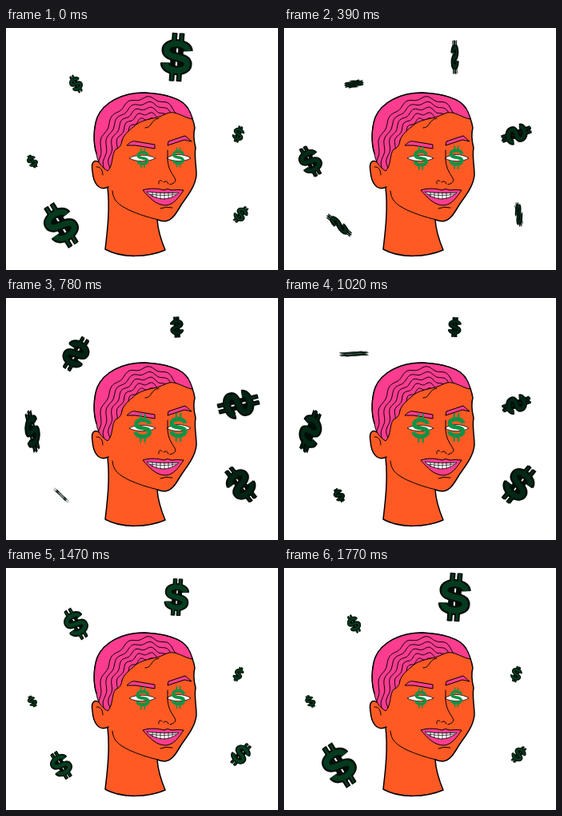
Animation of 340x303 px, one loop 1.8 s. Source, as an HTML page:

```html
<!DOCTYPE html>
<html lang="en">
<head>
<meta charset="utf-8">
<title>Dollar eyes</title>
<style>
  html, body { margin: 0; width: 100%; height: 100%; overflow: hidden; background: #fff; }
  svg { display: block; width: 340px; height: 303px; }
  .line { fill: none; stroke: #000; stroke-width: 1; stroke-linecap: round; stroke-linejoin: round; }
  .bold { stroke-width: 1.5; }
  .fine { stroke-width: .7; }
  .skin { fill: #ff5a24; }
  .pink { fill: #fc3d8f; stroke: #000; stroke-width: 1; stroke-linejoin: round; }
  .white { fill: #fff; stroke: #000; stroke-width: .8; stroke-linejoin: round; }
  .bars { stroke-width: var(--bar); }
  .edge { stroke: #020d08; stroke-width: 20; --bar: 10; }
  .face { stroke-width: 13; --bar: 5; }
  .eye { stroke: #0f9347; stroke-width: 15; --bar: 6; }
</style>
</head>
<body>
<svg viewBox="0 0 340 303">
  <defs>
    <path id="ess" fill="none" d="M24 -15C22 -35 -24 -35 -24 -15C-24 7 24 -7 24 15C24 35 -24 35 -25 14"/>
    <g id="dollar" fill="none">
      <use href="#ess"/>
      <path class="bars" d="M-8 -52V-31M8 -52V-31M-8 31V52M8 31V52"/>
    </g>
    <g id="struck" fill="none">
      <use href="#ess"/>
      <path class="bars" d="M-8 -54V54M8 -54V54"/>
    </g>
    <path id="hairShape" d="M127 179C119 174 114 167 113 157C109 145 109 126 114 112C122 93 145 81 173 81C197 82 220 88 227 100C230 105 232 110 233 114C224 113 213 104 204 106C197 108 192 112 184 113C175 115 166 117 159 124C152 130 147 134 145 141C144 147 142 150 137 152C132 157 134 173 127 179Z"/>
    <clipPath id="hairClip"><use href="#hairShape"/></clipPath>
  </defs>

  <path class="skin" d="M127 198C130 225 127 252 124 277C145 289 178 287 199 278C194 266 190 254 189 239L160 180Z"/>
  <path class="skin" d="M113 155L173 82L227 100C231 106 235 118 236 125C234 132 235 142 237 150C235 160 238 172 238 184C237 197 228 209 220 220C214 229 209 241 199 242Q194 242 189 240H140L128 199C116 205 109 194 108 179C106 169 110 164 116 168Z"/>
  <path class="line bold" d="M127 200C130 225 127 252 124 277C145 289 178 287 199 278C194 266 190 254 189 240"/>
  <path class="line bold" d="M227 100C231 106 235 118 236 125C234 132 235 142 237 150C235 160 238 172 238 184C237 197 228 209 220 220C214 229 209 241 199 242Q194 242 189 240"/>
  <path class="line" d="M133 204C134 216 140 221 154 228C165 233 177 237 190 240"/>
  <path class="line bold" d="M116 168C110 164 106 169 108 179C109 194 116 205 128 199"/>
  <path class="line" d="M113 174C118 173 121 178 121 184"/>
  <use href="#hairShape" class="pink"/>
  <path id="waves" class="line" clip-path="url(#hairClip)"/>
  <path class="line bold" d="M113 157C109 145 109 126 114 112C122 93 145 81 173 81C197 82 220 88 227 100"/>
  <path class="line" d="M174 125C183 125 180 115 191 113"/>

  <path class="pink" d="M151 147C155 143 158 141 162 142L186 146V151L162 147Z"/>
  <path class="pink" d="M202 147L203 142L224 135L232 142L223 140Z"/>
  <path class="white" d="M154 163C162 158 178 158 187 163C178 168 163 168 154 163Z"/>
  <path class="white" d="M201 163C209 157 222 157 231 163C223 168 209 168 201 163Z"/>
  <path class="line" d="M202 153V165C203 176 206 180 211 188C214 193 208 195 205 196M191 195C190 190 194 190 195 192M197 193Q201 190 203 195"/>
  <path class="pink" d="M171 203C180 200 191 201 197 203Q202 200 207 203Q214 202 222 203C216 212 210 221 200 222C187 222 179 212 171 203Z"/>
  <path class="white" d="M176 205C190 207 204 207 216 206C211 211 204 214 196 214C187 213 181 210 176 205Z"/>
  <path class="line fine" d="M180 208Q197 211 213 208M183 206V211M188 206V212M193 206V214M198 206V214M203 206V213M208 206V211"/>
  <path class="line" d="M193 226Q200 223 208 225"/>
  <g id="eyes"></g>
  <g id="coins"></g>
</svg>
<script>
const LOOP = 1800, STEP = 30;
const KEYS = [0, 390, 780, 1020, 1230, 1470];
const GLOW = [0.25, 0.1, 0, 0.05, 1, 0.3];

// axis: direction the coin flips around, 0 = vertical
const coins = [
  { x: 213.5, y: 36.5, tilt: 4, axis: 0,
    size: [56, 39, 24, 23, 32, 43], turn: [0, 106, 200, 345, 360, 360] },
  { x: 87.5, y: 70, tilt: -32, axis: 90,
    size: [21, 30, 42, 46, 47, 38], turn: [0, 106, 190, 268, 345, 360] },
  { x: 290.5, y: 133, tilt: 18, axis: 47,
    size: [19, 37, 48, 35, 28, 18], turn: [0, 142, 180, 216, 277, 318] },
  { x: 33, y: 167, tilt: -30, axis: 0,
    size: [16, 37, 51, 51, 29, 14], turn: [0, 15, 66, 130, 250, 345] },
  { x: 69, y: 247, tilt: -32, axis: -46,
    size: [54, 36, 24, 17, 23, 34], turn: [0, 110, 266, 345, 360, 360] },
  { x: 293.5, y: 233.5, tilt: 40, axis: 0,
    size: [21, 32, 46, 49, 38, 29], turn: [0, 106, 195, 345, 360, 360] }
];
const eyes = [[171, 163], [215.5, 162]];

const byId = id => document.getElementById(id);

function addDollar(parent, cls) {
  const use = document.createElementNS("http://www.w3.org/2000/svg", "use");
  use.setAttribute("href", cls === "edge" ? "#struck" : "#dollar");
  use.setAttribute("class", cls);
  return parent.appendChild(use);
}

// Smooth cyclic curve through the key values; gain is added per loop.
function curve(values, t, gain = 0) {
  const n = KEYS.length;
  const at = i => {
    const lap = Math.floor(i / n), k = i - lap * n;
    return [KEYS[k] + lap * LOOP, values[k] + lap * gain];
  };
  let i = n - 1;
  while (KEYS[i] > t) i--;
  const [a, b, c, d] = [at(i - 1), at(i), at(i + 1), at(i + 2)];
  const slope = (p, q) => (q[1] - p[1]) / (q[0] - p[0]);
  const span = c[0] - b[0], u = (t - b[0]) / span;
  const m = slope(a, c) * span, k = slope(b, d) * span;
  const u2 = u * u, u3 = u2 * u;
  return (2 * u3 - 3 * u2 + 1) * b[1] + (u3 - 2 * u2 + u) * m
    + (3 * u2 - 2 * u3) * c[1] + (u3 - u2) * k;
}

function drawWaves() {
  let d = "";
  for (let row = 1; row <= 6; row++) {
    for (let s = 0; s <= 120; s++) {
      const a = Math.PI * (1.1 - s / 120 * 1.1);
      const inset = row * 6.5 + 1.8 * Math.sin(a * 15 + row * 0.6);
      const x = 176 + (66 - inset) * Math.cos(a);
      const y = 168 - (87 - inset) * Math.sin(a);
      d += (s ? "L" : "M") + x.toFixed(1) + " " + y.toFixed(1);
    }
  }
  byId("waves").setAttribute("d", d);
}

function drawCoin(coin, t, green) {
  const size = curve(coin.size, t);
  const turn = curve(coin.turn, t, 360) * Math.PI / 180;
  const flat = Math.cos(turn);
  const squash = (flat < 0 ? -1 : 1) * Math.max(Math.abs(flat), 0.08);
  const depth = 0.6 + size * 0.02 * Math.abs(Math.sin(turn));
  [-depth, depth, 0].forEach((shift, i) => {
    coin.parts[i].setAttribute("transform",
      `translate(${coin.x} ${coin.y}) rotate(${coin.axis}) translate(${shift} 0) ` +
      `scale(${squash} 1) rotate(${coin.tilt - coin.axis}) scale(${size / 100})`);
  });
  coin.parts[2].style.stroke = green;
}

function draw(t) {
  const glow = Math.min(1, Math.max(0, curve(GLOW, t)));
  const green = `rgb(${3 + 8 * glow} ${36 + 86 * glow} ${20 + 38 * glow})`;
  coins.forEach(coin => drawCoin(coin, t, green));
  const scale = (29.5 - 5.5 * Math.cos(2 * Math.PI * t / LOOP)) / 100;
  eyes.forEach(([x, y], i) =>
    eyeParts[i].setAttribute("transform", `translate(${x} ${y}) scale(${scale})`));
}

drawWaves();
const eyeParts = eyes.map(() => addDollar(byId("eyes"), "eye"));
coins.forEach(coin => {
  coin.parts = ["edge", "edge", "face"].map(cls => addDollar(byId("coins"), cls));
});

const start = performance.now();
function tick() {
  const t = (performance.now() - start) % LOOP;
  draw(Math.floor(t / STEP) * STEP);
  requestAnimationFrame(tick);
}
tick();
</script>
</body>
</html>
```
